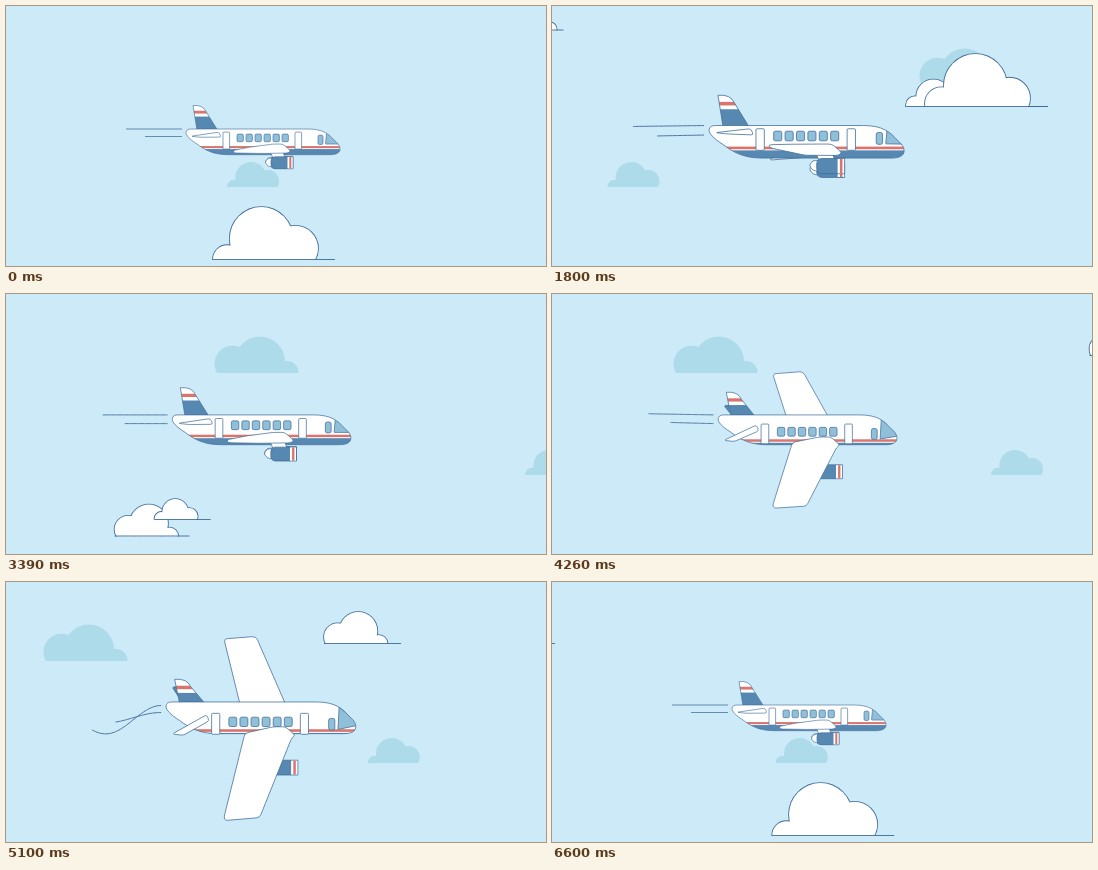
These frames come from a looping animation (540x260 px, 6630 ms). An HTML page with a canvas:

```html
<!DOCTYPE html>
<html lang="en">
<head>
<meta charset="utf-8">
<title>Plane in the clouds</title>
<style>
html, body { margin: 0; width: 540px; height: 260px; overflow: hidden; background: #cdeaf8; }
canvas { display: block; }
</style>
</head>
<body>
<canvas id="stage" width="540" height="260"></canvas>
<script>
const ctx = document.getElementById('stage').getContext('2d');
const LOOP = 6630, STEP = 30;
const SKY = '#cdeaf8', PALE = '#addbea', LINE = '#3f6c98', BLUE = '#5688b2',
      GLASS = '#8fbfd9', RED = '#d9756d', WHITE = '#fff';

// Smooth step from 0 to 1 between two times
const ease = (t, from, to) =>
  (1 - Math.cos(Math.PI * Math.min(1, Math.max(0, (t - from) / (to - from))))) / 2;

// Smooth hill: 0 at the ends, 1 at the peak
const hill = (t, from, peak, to) => ease(t, from, peak) - ease(t, peak, to);

// Bank right, lean back, then the wide bank
const rollAt = t => 1 + 60 * hill(t, 754, 1320, 1886)
  - 17 * hill(t, 1200, 2300, 3400) + 122 * hill(t, 3770, 4800, 5480);

const scaleAt = t => 1 + .16 * hill(t, 830, 1800, 1e9) - .16 * ease(t, 5100, 6400)
  + .106 * hill(t, 830, 1800, 3100) + .075 * hill(t, 4200, 5000, 5800);

// Three round lobes on a flat base; lean > 0 makes the right lobe the larger one
function cloud(x, base, width, height, lean, tail) {
  const lobe = r => -Math.max(0, r - .13) * 1.3 * width;
  const left = .175 - lean, right = .175 + lean;
  const lobes = [
    [left * width, lobe(left), left * width],
    [(.5 - lean) * width, .3 * width - height, .3 * width],
    [(1 - right) * width, lobe(right), right * width]
  ];
  const each = paint => lobes.forEach(([cx, cy, r]) => {
    ctx.beginPath();
    ctx.arc(cx, cy, r, 0, 7);
    ctx[paint]();
  });
  ctx.save();
  ctx.translate(x, base);
  ctx.fillStyle = tail ? WHITE : PALE;
  ctx.strokeStyle = LINE;
  ctx.lineWidth = 1.7;
  ctx.save();
  ctx.beginPath();
  ctx.rect(-5, -80, 200, 80);
  ctx.clip();
  if (tail) each('stroke');
  each('fill');
  ctx.beginPath();
  ctx.moveTo(lobes[0][0], 0);
  lobes.forEach(([cx, cy]) => ctx.lineTo(cx, cy));
  ctx.lineTo(lobes[2][0], 0);
  ctx.fill();
  ctx.restore();
  if (tail) {
    ctx.lineWidth = .9;
    ctx.beginPath();
    ctx.moveTo(0, -.5);
    ctx.lineTo(tail, -.5);
    ctx.stroke();
  }
  ctx.restore();
}

function paint(path, fill) {
  ctx.fillStyle = fill;
  ctx.fill(path);
  ctx.stroke(path);
}

// Polygon whose corners are cut by at most radius and rounded
function poly(points, radius, fill) {
  const path = new Path2D(), n = points.length;
  const toward = ([x, y], [px, py]) => {
    const k = Math.min(.5, radius / Math.hypot(px - x, py - y));
    return [x + (px - x) * k, y + (py - y) * k];
  };
  points.forEach((p, i) => {
    path.lineTo(...toward(p, points[(i + n - 1) % n]));
    path.quadraticCurveTo(...p, ...toward(p, points[(i + 1) % n]));
  });
  path.closePath();
  paint(path, fill);
}

function box(x, y, w, h, r, fill) {
  const path = new Path2D();
  path.roundRect(x, y, w, h, r);
  paint(path, fill);
}

function bar(x, y, w, h, fill) {
  ctx.fillStyle = fill;
  ctx.fillRect(x, y, w, h);
}

function engine(dy) {
  ctx.save();
  ctx.translate(0, dy);
  poly([[2, 20], [5, 16], [12, 16], [12, 25], [5, 24]], 2, WHITE);
  box(8, 14.5, 22, 12, [4, 0, 0, 4], BLUE);
  bar(24.5, 14.8, 5.2, 11.4, WHITE);
  bar(26.3, 14.8, 2, 11.4, RED);
  ctx.restore();
}

// Fill a shape white, add stripes inside it, then outline it
function striped(path, stripes) {
  ctx.save();
  ctx.fillStyle = WHITE;
  ctx.fill(path);
  ctx.clip(path);
  stripes();
  ctx.restore();
  ctx.stroke(path);
}

function fin(roll) {
  const top = -36.5 + roll * .07, path = new Path2D();
  path.moveTo(-66, -12);
  path.lineTo(-70, top);
  path.quadraticCurveTo(-60, top - 1, -57, top + 6);
  path.lineTo(-45.5, -12);
  path.closePath();
  striped(path, () => {
    bar(-75, top + 5.2, 35, 2.8, RED);
    bar(-75, top + 11, 35, 20, BLUE);
  });
}

const HULL = new Path2D('M-72-13H45C60-13 66-8 72-1C76 2 77 5 77 7C77 11 73 12.7 67 12.7' +
  'H-35C-50 12.7-58 8-66 2C-74-3-77-7-77-9C-77-12-75-13-72-13Z');

function hull(roll) {
  const stripe = 4 + roll * .07, dy = roll * .1;
  striped(HULL, () => {
    bar(-80, stripe, 160, 2.1, RED);
    bar(-80, stripe + 3, 160, 20, BLUE);
    poly([[63.5, -9], [80, 2 + dy / 2], [62.5, 2 + dy]], .5, GLASS);
  });
  for (let i = 0; i < 6; i++) box(-26 + i * 9, -8 + dy, 6.4, 7.6, 1.3, GLASS);
  box(55, -7 + dy, 5, 9.4, 1.6, GLASS);
  for (const x of [-40, 32]) box(x, -10 + dy * .85, 6.6, 17, .8, WHITE);
}

function trails(t) {
  const amp = hill(t, 4480, 5100, 5720);
  const tilt = (rollAt(t - 90) - rollAt(t)) * .06 * (1 - amp);
  const travel = (t - 5100) / 600;
  for (const [length, y, size] of [[56, -13, 11.5], [37, -5.5, 4.2]]) {
    ctx.beginPath();
    for (let u = 0; u <= length; u++) {
      const wave = size * (1.25 - Math.cos(Math.PI * (u / 45 - travel)));
      ctx.lineTo(-81 - u, y + amp * wave + tilt * u / length);
    }
    ctx.stroke();
  }
}

function plane(t) {
  const roll = rollAt(t), scale = scaleAt(t);
  const lift = roll * .07, tail = roll * .26, hang = roll * .27;
  ctx.save();
  ctx.translate(257 - (scale - 1) * 9, 136);
  ctx.scale(scale, scale);
  ctx.strokeStyle = LINE;
  ctx.lineJoin = 'round';
  ctx.lineWidth = .75;
  trails(t);
  ctx.lineWidth = .62;

  // Far side
  engine(-hang);
  poly([[-13, 5], [-30, 9 - roll], [-4, 7 - roll], [27, 5]], 3, WHITE);
  poly([[-72, -6 - tail], [-63, -7 - tail], [-45, -7], [-58, -4]], 1.5, BLUE);

  fin(roll);
  hull(roll);

  // Near side
  poly([[-72, -6 + tail], [-44, -10 + roll * .1], [-42, -5 + roll * .1], [-63, -5 + tail]], 2, WHITE);
  poly([[7, 9 + lift], [20, 9 + lift], [22 - roll * .1, 16 + hang], [10, 16 + hang]], 1, WHITE);
  engine(hang);
  poly([[-30, 7.5 + roll], [-13, 5 + Math.min(roll * .6, roll * .1)], [10, 2 + lift], [20, 2 + lift],
        [28, 9 + lift], [25, 11 + lift], [-1, 10.5 + Math.max(0, roll * .96)], [-29, 10 + roll]], 2.5, WHITE);
  ctx.restore();
}

function draw(t) {
  bar(0, 0, 540, 260, SKY);
  const lap = 610;
  cloud((281 - lap * t / LOOP + lap) % lap - 60, 181, 52, 25, .04);
  cloud(547.5 - t * .1, 79, 84, 36.5, -.04);
  plane(t);

  const sinceStart = t > LOOP / 2 ? t - LOOP : t;
  cloud(207 - sinceStart * .44, 254, 105, 53, .04, 122);
  cloud(570 - t * .338, 24.5, 43, 18, -.02, 50);
  const pair = 354 - (t - 1800) * .461;
  cloud(pair, 101, 57, 27.5, .02, 142);
  cloud(pair + 19, 101, 105, 53, .02, 123);
  const low = 453 - (t - 2550) * .41;
  cloud(low, 242.5, 63.5, 32, -.04, 75);
  cloud(low + 40, 226, 43, 21, .02, 56);
  cloud(318 - (t - 5100) * .2613, 62, 63.5, 32, -.04, 77);
}

const start = performance.now();
function tick() {
  const t = (performance.now() - start) % LOOP;
  draw(Math.floor(t / STEP) * STEP);
  requestAnimationFrame(tick);
}
tick();
</script>
</body>
</html>
```
